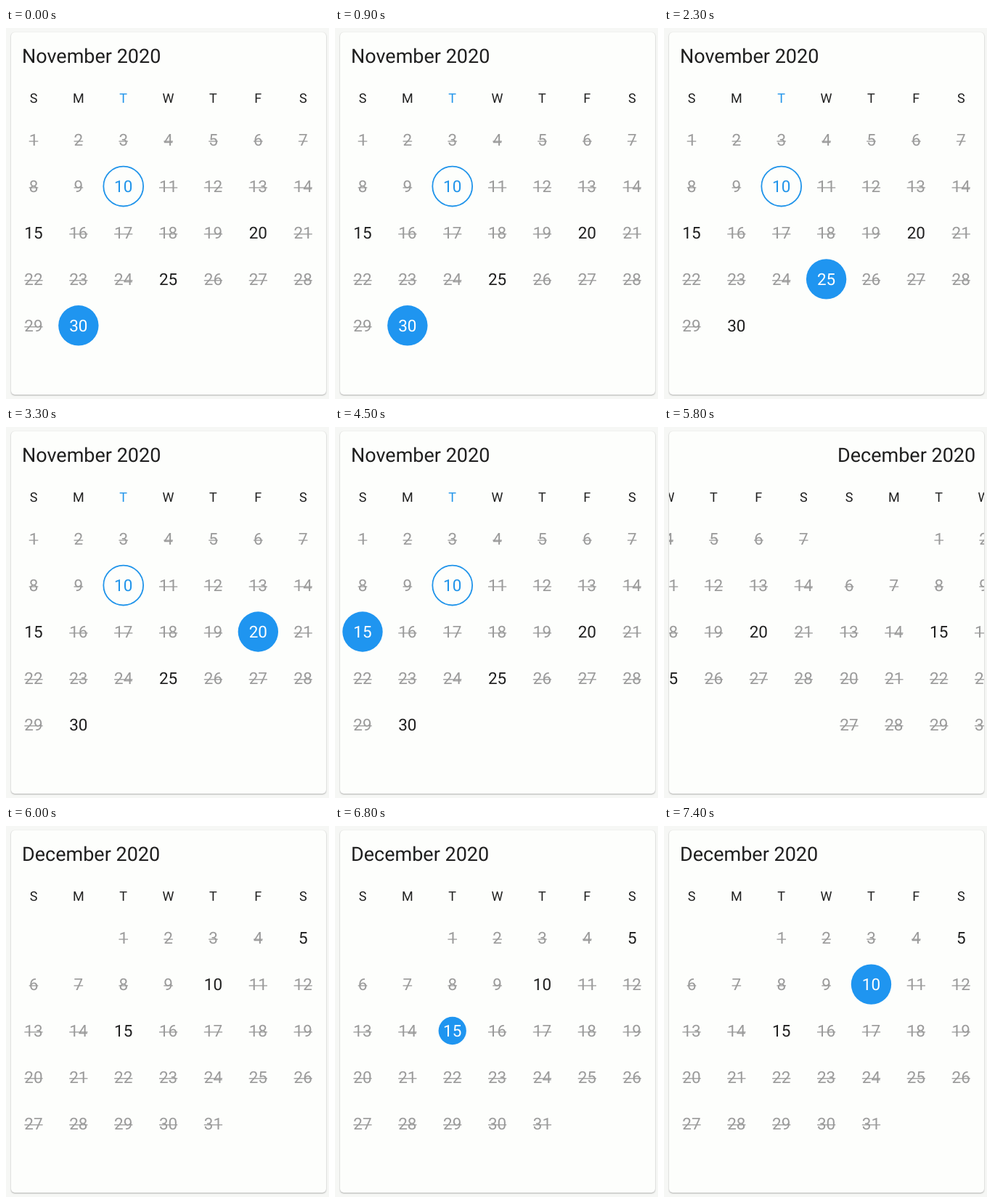
An HTML page that plays this animation: 445 by 511 pixels, repeating every 8 s.

```html
<!DOCTYPE html>
<html lang="en">
<head>
<meta charset="utf-8">
<title>Calendar</title>
<style>
  html, body { margin: 0; width: 100%; height: 100%; overflow: hidden; background: #f6f7f5; }
  .card {
    position: absolute; left: 7px; top: 6px; width: 434px; height: 499px;
    border-radius: 5px; background: #fdfefc; overflow: hidden;
    box-shadow: 0 1px 2px rgba(0, 0, 0, .28), 0 0 1px rgba(0, 0, 0, .12);
  }
  svg { display: block; }
  text {
    font-family: Roboto, "Noto Sans", sans-serif; fill: #1f1f1f;
    text-rendering: geometricPrecision;
  }
  .title { font-size: 27px; }
  .week { font-size: 18px; text-anchor: middle; }
  .day { font-size: 22.5px; text-anchor: middle; }
  .off { fill: #9b9b9b; }
  .today { fill: #2094ea; }
  .picked { fill: #fff; }
  .ring { fill: none; stroke: #2094ea; stroke-width: 1.8; }
  .disc { fill: #1f95f0; }
</style>
</head>
<body>
<div class="card"><svg id="cal" width="434" height="499" viewBox="7 6 434 499"></svg></div>
<script>
const LOOP = 8000, STEP = 100, WIDTH = 434;
const GROW = 180, LEAD = 80, RADIUS = 27.7;
const SLIDE = { from: 5600, to: 6000 };

const months = [
  { title: "November 2020", first: 0, days: 30, open: [10, 15, 20, 25, 30], today: 10 },
  { title: "December 2020", first: 2, days: 31, open: [5, 10, 15] }
];

// time, month index, day
const picks = [
  [-1000, 0, 30], [1600, 0, 25], [2600, 0, 20], [4300, 0, 15],
  [5100, 0, 10], [6800, 1, 15], [7300, 1, 10]
];

const colX = c => 38 + 61.87 * c;
const rowY = r => 154.2 + 63.9 * r;

function add(parent, tag, attrs, text) {
  const el = document.createElementNS("http://www.w3.org/2000/svg", tag);
  for (const key in attrs) el.setAttribute(key, attrs[key]);
  if (text !== undefined) el.textContent = text;
  parent.append(el);
  return el;
}

function buildMonth(month) {
  const group = add(document.getElementById("cal"), "g", {});
  const disc = add(group, "circle", { class: "disc", r: 0 });
  const cells = {};
  let ring = null;
  const todayCol = month.today ? (month.first + month.today - 1) % 7 : -1;

  add(group, "text", { class: "title", x: 22, y: 48 }, month.title);
  [..."SMTWTFS"].forEach((name, c) =>
    add(group, "text", { class: c === todayCol ? "week today" : "week", x: colX(c), y: 103 }, name));

  for (let d = 1; d <= month.days; d++) {
    const slot = month.first + d - 1;
    const x = colX(slot % 7), y = rowY(Math.floor(slot / 7));
    const open = month.open.includes(d);
    const base = open ? (d === month.today ? "day today" : "day") : "day off";
    if (d === month.today) ring = add(group, "circle", { class: "ring", cx: x, cy: y, r: 27.4 });
    const label = add(group, "text", { class: base, x, y: y + 8 }, d);
    if (open) {
      cells[d] = { x, y, base, label };
    } else {
      const w = d < 10 ? 12.6 : 25.3;
      add(group, "rect", { class: "off", x: x - w / 2, y: y + 1.2, width: w, height: 1.3 });
    }
  }
  return { group, disc, cells, ring, today: month.today };
}

const views = months.map(buildMonth);
const clamp = v => Math.min(1, Math.max(0, v));

function latestPick(index, t) {
  return picks.filter(p => p[1] === index && p[0] <= t).pop();
}

function draw(t) {
  const s = clamp((t - SLIDE.from) / (SLIDE.to - SLIDE.from));
  const shift = s * s * (3 - 2 * s);

  views.forEach((view, i) => {
    view.group.setAttribute("transform", `translate(${(i - shift) * WIDTH} 0)`);
    const pick = latestPick(i, t);
    const day = pick ? pick[2] : 0;

    for (const d in view.cells) {
      const cell = view.cells[d];
      cell.label.setAttribute("class", +d === day ? "day picked" : cell.base);
    }
    if (view.ring) view.ring.style.display = day === view.today ? "none" : "";

    let radius = 0;
    if (pick) {
      const p = clamp((t - pick[0] + LEAD) / GROW);
      radius = RADIUS * (1 - (1 - p) ** 2);
      view.disc.setAttribute("cx", view.cells[day].x);
      view.disc.setAttribute("cy", view.cells[day].y);
    }
    view.disc.setAttribute("r", radius);
  });
}

const start = performance.now();
function tick() {
  const t = (performance.now() - start) % LOOP;
  draw(Math.floor(t / STEP) * STEP);
  requestAnimationFrame(tick);
}
tick();
</script>
</body>
</html>
```
